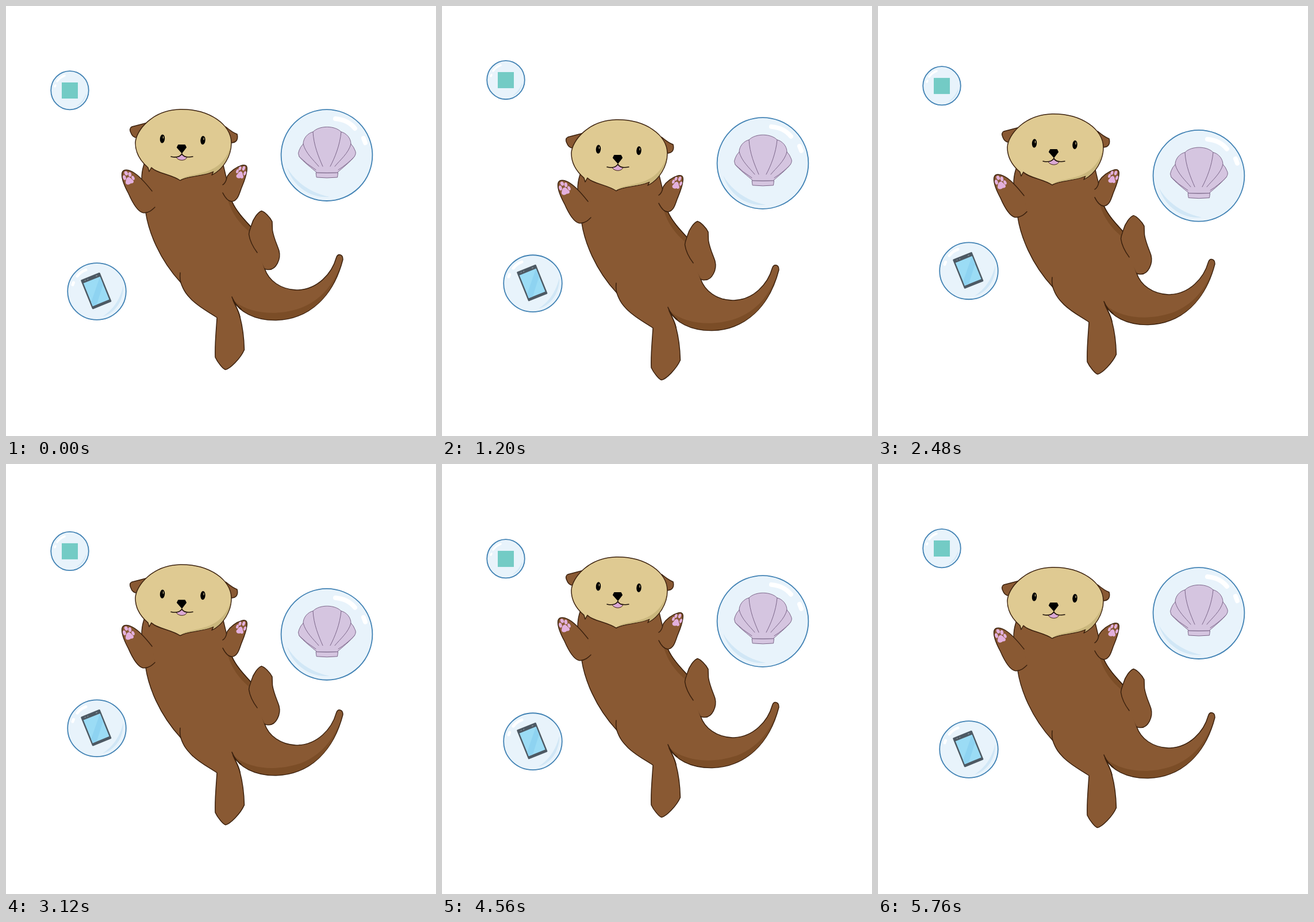
Write an HTML page that moves like this. It is 748 px wide and 748 px high and loops after 5.84 s.

```html
<!DOCTYPE html>
<html lang="en">
<head>
<meta charset="utf-8">
<title>Floating otter</title>
<style>
  html, body { margin: 0; height: 100%; overflow: hidden; background: #fff; }
  svg { display: block; width: 100%; height: 100%; }
  .bubble { fill: #e8f3fb; stroke: #4182b4; stroke-width: 1.8; }
  .shine { fill: none; stroke: #fff; stroke-linecap: round; }
  .tint { fill: #d1e7f6; }
  .fur { fill: #895933; stroke: #3b210e; stroke-width: 1.5; stroke-linejoin: round; stroke-linecap: round; }
  .line { fill: none; }
  .dark { fill: #7b4d27; }
  .pad { fill: #e3b0dd; }
  .shell { fill: #d5c5e0; stroke: #7b6689; stroke-width: 1; stroke-linejoin: round; stroke-linecap: round; }
</style>
</head>
<body>
<svg viewBox="0 0 748 748">
  <g id="badge">
    <ellipse class="bubble" cx="111" cy="146.7" rx="32.8" ry="33.6"/>
    <path class="tint" d="M140 151C139 162 132 171 122 175C131 168 136 161 140 151Z"/>
    <path class="shine" stroke-width="3.5" d="M89 131Q94 124 102 121M85 140L86 138"/>
    <rect x="97" y="133" width="28" height="28" fill="#73cbc5"/>
  </g>

  <g id="phone">
    <ellipse class="bubble" cx="158" cy="496.5" rx="50.8" ry="49.4"/>
    <path class="tint" d="M204 487C205 513 189 535 168 540C184 530 198 513 204 487Z"/>
    <path class="shine" stroke-width="5" d="M124 470Q130 462 139 459M116 485L117.5 481"/>
    <g transform="translate(156.8 495.5) rotate(-22)">
      <rect x="-18" y="-27.5" width="36" height="55" rx="1.5" fill="#4d5963"/>
      <path fill="#9bdcf5" d="M-15.5-20.500H15.500V22.500H-15.500Z"/>
      <path fill="#8ed3f1" d="M15.500-20.500V-6L-8 22.500H-15.500V15Z"/>
      <path stroke="#87929a" stroke-width="1.5" d="M-12-24H-10M-7-24H-5M9-24H12"/>
    </g>
  </g>

  <g id="scallop">
    <circle class="bubble" cx="558" cy="259.6" r="79.4"/>
    <path class="tint" d="M489 281C503 306 530 325 563 332C530 335 500 315 489 281Z"/>
    <path class="shine" stroke-width="8" d="M573 196Q595 198 607 213M622 230L625 238"/>
    <path class="shell" d="M541 290C533 283 516 270 510 262Q507 256 510 251Q512 245 517 240C517 230 525 221 534 219C545 207.500 572 207.500 583 219C592 221 600 230 600 240Q605 245 607 251Q610 256 606 262C600 270 584 283 576 290Z"/>
    <path class="shell" d="M539.5 290Q558 291 577.5 290L576.500 298Q558 300 540.500 298Z"/>
    <path class="shell line" d="M534 219C535 242 544 263 551 279M583 219C581 242 572 264 564 279M517 240C521 256 535 268 544 279M600 240C596 256 581 268 572 279M510 262Q523 275 539 285M606 262Q594 275 578 285"/>
  </g>

  <g id="otter">
    <path class="fur" d="M242 270C235 288 235 300 238 325L243 359C248 392 266 440 304 481C309 496 315 503 324 512C339 526 354 533 367 542C366 562 363 587 364 611C368 620 378 632 382 632.5C390 631 408 613 414.500 598C414 578 411 556 407 541C405 530 400 524 395 512C406 531 431 547 470 546.5C529 545 570 503 586 441C586 431 577 430 574.5 438C567 465 542 494 505 494C478 493 457 478 450 457L425 383C413 370 400 356 393 340L378 277Z"/>
    <path class="dark" d="M386 338L393 341C400 356 413 370 424 383L422.500 392C406 378 393 361 386 338ZM398 514C425 536 475 540 516 524C549 510 568 485 580 456C564 511 523 544 470 545.8C434 546 409 532 398 514Z"/>
    <path class="fur line" d="M303 464Q302 474 304 481M407 541C404 528 398 520 393 506Q399 520 409 527M425 383C413 370 400 356 393 340"/>
    <path class="fur" d="M437 429C431 421 424 408 422.5 397C423 390 426 385 427 381C430 370 438 359 444.5 356.5C450 358 459 367 463 375L463.5 390C466 405 472 416 475 426C478.500 440 470 459 457 458.500Q452 459 450 457"/>
    <path class="fur" d="M254 322C246 312 236 299 224 291C214 284 204 283 202 290C200 299 206 313 213 326C220 342 228 357 238 359.5C248 361 255 354 259 350"/>
    <path class="fur" d="M377 311C384 307 383 300 385 296C390 288 400 280 411 277C418 275.500 420 279 419 286C418 297 413 308 409 318C405 330 402 339 393 340C386 340 380 331 377 325"/>

    <g class="pad">
      <ellipse cx="206" cy="298.5" rx="2.7" ry="4.3" transform="rotate(-18 206 298.5)"/>
      <ellipse cx="209" cy="291" rx="2.9" ry="3.9" transform="rotate(-30 209 291)"/>
      <ellipse cx="215.5" cy="293" rx="2.7" ry="4.1" transform="rotate(-10 215.5 293)"/>
      <ellipse cx="221" cy="299" rx="2.4" ry="3.9" transform="rotate(-25 221 299)"/>
      <path d="M213 297.500C216 297 218 301 221 303C224 307 220 309 217 308.500C214 312 208 311 208 307C208.500 303 209.500 298 213 297.500Z"/>
      <ellipse cx="402.5" cy="287.5" rx="2.2" ry="3.6" transform="rotate(20 402.5 287.5)"/>
      <ellipse cx="407" cy="282.5" rx="2.3" ry="3.6" transform="rotate(20 407 282.5)"/>
      <ellipse cx="413.5" cy="282.5" rx="2.4" ry="4" transform="rotate(20 413.5 282.5)"/>
      <ellipse cx="415.5" cy="291" rx="2.2" ry="3.8" transform="rotate(20 415.5 291)"/>
      <path d="M407 288C410 287 412 290 412 294C415 298 411 302 408 299C404 301 399 298 401 294C404 292 404 289 407 288Z"/>
    </g>

    <path class="fur" d="M246 203L219 210C215 212 215 216 217 220Q220 229 228 229ZM382 210Q394 220 402 223C404 231 402 238 391 238Z"/>
    <path class="fur" style="fill:#dfca92" d="M303 179.8C355 179 391.5 207 392 238C392 261 378 284 358 294L361 288C341 297 315 295 303 303.5C288 293 262 291 253 281L249 288L247 281C233 269 225 255 225 238C226 216 255 181 303 179.8Z"/>
    <path fill="#cab77d" d="M391 243C389 263 377 283 360 292L362 287C342 296 317 295 304 302C313 293 339 294 358 284C375 276 386 261 391 243Z"/>
    <ellipse cx="272" cy="231" rx="4.2" ry="7.6" transform="rotate(4 272 231)"/>
    <ellipse cx="342.5" cy="233.5" rx="4.2" ry="7.6" transform="rotate(4 342.5 233.5)"/>
    <path fill="none" stroke="#dfca92" stroke-width="1.2" stroke-linecap="round" d="M273.5 227V230M344 229.5V232.500"/>
    <path fill="#dba9d5" stroke="#3b210e" d="M296 263C301 262 304 260 306 258C308 261 311 263 315 263C312 270 300 270 296 263Z"/>
    <path fill="none" stroke="#1c1008" stroke-width="1.5" stroke-linecap="round" d="M287 262C296 264 303 262 306 257C308 262 316 264 325 262"/>
    <path stroke="#000" stroke-width="2" stroke-linejoin="round" d="M300 242H311L313 246L306 255L298 246Z"/>
  </g>
</svg>
<script>
  const STEP = 80, STEPS = 73, SWING = 18.7;
  const shift = (id, y) =>
    document.getElementById(id).setAttribute("transform", `translate(0 ${y.toFixed(2)})`);

  function draw() {
    const step = Math.floor(performance.now() / STEP) % STEPS;
    const angle = 2 * Math.PI * step / (STEPS - 1);
    const bob = SWING * Math.sin(angle);
    const drift = SWING * (1 - Math.cos(angle));
    shift("otter", bob);
    shift("badge", -bob);
    shift("scallop", drift);
    shift("phone", -drift);
    requestAnimationFrame(draw);
  }
  draw();
</script>
</body>
</html>
```
